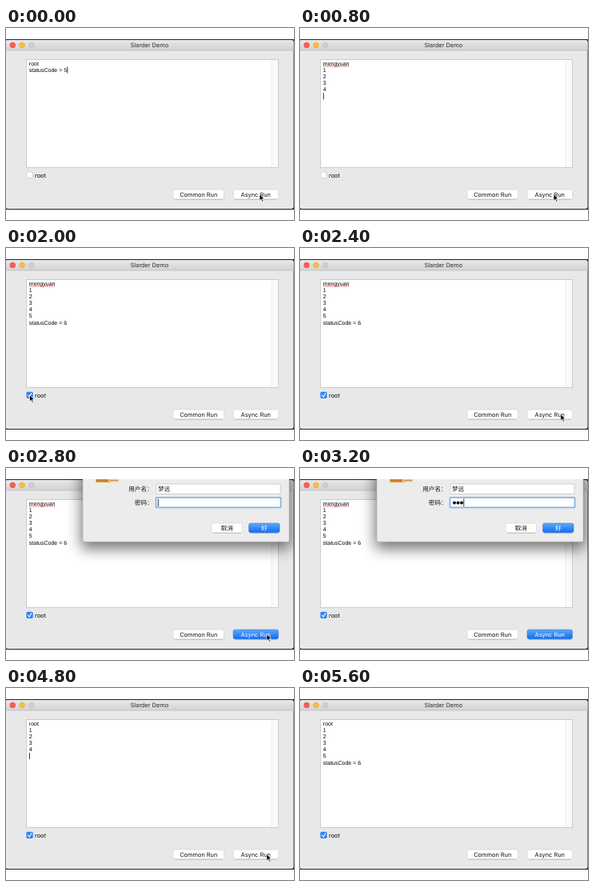
Recreate the animation shown at these times as an HTML page. Size 360 px wide and 240 px high, loop 6000 ms.

```html
<!DOCTYPE html>
<html lang="en">
<head>
<meta charset="utf-8">
<title>Demo</title>
<style>
  html, body { margin: 0; width: 100%; height: 100%; overflow: hidden; background: #fff; }
  svg { display: block; width: 360px; height: 240px; }
  text { white-space: pre; text-rendering: geometricPrecision; fill: #111; }
  .ui { font: 7.4px Inter, "Liberation Sans", sans-serif; }
  .mid { text-anchor: middle; }
  .out { font: 7px "Liberation Sans", Arial, sans-serif; fill: #000; }
  .cjk { font: 7.6px "Noto Sans CJK SC", "Noto Sans CJK", sans-serif; }
  .end { text-anchor: end; }
  .blue text { fill: #fff; }
</style>
</head>
<body>
<svg viewBox="0 0 360 240">
  <defs>
    <linearGradient id="bar" x2="0" y2="1">
      <stop stop-color="#e9e8e9"/><stop offset="1" stop-color="#d3d2d3"/>
    </linearGradient>
    <linearGradient id="accent" x2="0" y2="1">
      <stop stop-color="#5faaf9"/><stop offset="1" stop-color="#0f6bf3"/>
    </linearGradient>
    <clipPath id="screen"><rect y="14" width="360" height="213"/></clipPath>
    <filter id="blur" x="-30%" y="-50%" width="160%" height="200%"><feGaussianBlur stdDeviation="9"/></filter>
  </defs>
  <g clip-path="url(#screen)">
    <rect y="14" width="360" height="213" fill="#20242f"/>
    <rect x="-.5" y="15" width="360" height="211" rx="3" fill="#e8e8e8"/>
    <path d="M-.5 28V18a3 3 0 0 1 3-3H356.500a3 3 0 0 1 3 3V28Z" fill="url(#bar)"/>
    <path d="M0 28H359.500" stroke="#bcbbbc" stroke-width=".7"/>
    <g stroke-width=".5">
      <circle cx="8.300" cy="21.400" r="3.400" fill="#fc5b55" stroke="#dc4741"/>
      <circle cx="20" cy="21.400" r="3.400" fill="#fbbd3e" stroke="#d9a032"/>
      <circle cx="31.800" cy="21.400" r="3.400" fill="#d0cfd0" stroke="#bab9ba"/>
    </g>
    <text class="ui mid" x="179.300" y="24" fill-opacity=".85">Slarder Demo</text>

    <rect x="25.500" y="39.500" width="315" height="135" fill="#fff" stroke="#c3c3c3" stroke-width=".8"/>
    <rect x="332" y="40" width="8" height="134" fill="#fafafa"/>
    <path d="M332 40V174" stroke="#e6e6e6" stroke-width=".7"/>
    <g id="output"></g>
    <path id="squiggle" d="M29 48H61" stroke="#e8403a" stroke-width="1.100" stroke-dasharray="1.300 .9"/>
    <path id="caret" stroke="#000" stroke-width=".8"/>

    <g id="boxOff"><rect x="25.800" y="180" width="7.600" height="7.600" rx="1.500" fill="#fff" stroke="#bdbdbd" stroke-width=".6"/></g>
    <g id="boxOn">
      <rect x="25.500" y="179.700" width="8.200" height="8.200" rx="1.600" fill="#2f83f7"/>
      <path d="M27.500 184L29.200 186L31.900 181.600" fill="none" stroke="#fff" stroke-width="1.100" stroke-linecap="round"/>
    </g>
    <text class="ui" x="36" y="186.500">root</text>
    <g id="buttons"></g>

    <g id="dialog">
      <rect x="94" y="-20" width="262" height="121" rx="4" fill="#000" opacity=".55" filter="url(#blur)"/>
      <rect x="96" y="0" width="258" height="92.300" rx="2" fill="#ececec" stroke="#a5a5a5" stroke-width=".5"/>
      <path d="M112.500 13H131V18H112.500Z" fill="#d98f2b"/>
      <path d="M112.500 15.300H130" stroke="#b86e18" stroke-width=".8"/>
      <path d="M128 13H141V17.500H128Z" fill="#e9c795"/>
      <path d="M130 15.500H140" stroke="#b8873f" stroke-width=".8"/>
      <text class="cjk end" x="183.600" y="28.900">用户名：</text>
      <text class="cjk end" x="183.600" y="45.900">密码：</text>
      <rect x="188" y="20" width="155" height="12.500" fill="#fff" stroke="#bfbfbf" stroke-width=".7"/>
      <text class="cjk" x="190" y="28.900">梦远</text>
      <rect x="187.500" y="36.800" width="156" height="12.600" rx=".8" fill="#fff" stroke="#84b3ea" stroke-width="1.800"/>
      <g id="dots"><circle cx="193" cy="43.500" r="1.900"/><circle cx="197.500" cy="43.500" r="1.900"/><circle cx="202" cy="43.500" r="1.900"/></g>
      <path id="passCaret" stroke="#000" stroke-width=".8"/>
      <g id="choices"></g>
    </g>
    <path id="mouse" d="M0 0V8.200L1.900 6.500L3.300 9.700L4.700 9.100L3.300 6H5.800Z" stroke="#fff" stroke-width=".7" stroke-linejoin="round"/>
  </g>
</svg>
<script>
const $ = id => document.getElementById(id);
const STEP = 400, LOOP = 6000, LINE = 8.17;
const USER = "mengyuan";

const show = (id, on) => $(id).setAttribute("visibility", on ? "inherit" : "hidden");

function button(x, y, w, label, font, blue) {
  const paint = blue ? 'fill="url(#accent)" stroke="#2a6fd6"' : 'fill="#fff" stroke="#c6c6c6"';
  return `<g class="${blue ? "blue" : ""}">
    <path d="M${x + 2} ${y + 12.2}h${w - 4}" stroke="#aaa" stroke-width=".8"/>
    <rect x="${x}" y="${y}" width="${w}" height="11.8" rx="2.3" ${paint} stroke-width=".5"/>
    <text class="${font} mid" x="${x + w / 2}" y="${y + 8.6}">${label}</text></g>`;
}

// Output of a run: who, numbers printed so far, and the exit line.
function log(who, count, code) {
  const lines = [who];
  for (let i = 1; i <= count; i++) lines.push(String(i));
  lines.push(code ? "statusCode = " + code : "");
  return lines;
}

const ASYNC = [317, 207.5], ASYNC2 = [325.8, 207.5];
const done = log(USER, 5, 6);
const steps = [
  { out: log("root", 0, 5), mouse: ASYNC, caret: 1 },
  { out: log(USER, 2), mouse: ASYNC, caret: 1 },
  { out: log(USER, 4), mouse: ASYNC, caret: 1 },
  { out: log(USER, 5), mouse: ASYNC, caret: 1 },
  { out: done, mouse: [125.6, 208.5], caret: 1 },
  { out: done, mouse: [29.5, 183.5], root: 1 },
  { out: done, mouse: ASYNC2, root: 1 },
  { out: done, mouse: ASYNC2, root: 1, ask: 1 },
  { out: done, root: 1, ask: 1, typed: 1 },
  ...[1, 2, 3, 4, 5].map(n => ({ out: log("root", n), mouse: ASYNC2, root: 1, caret: 1 })),
  { out: log("root", 5, 6), root: 1 }
];

$("choices").innerHTML = button(257, 69, 38.5, "取消", "cjk") + button(303.5, 69, 38.5, "好", "cjk", true);

function draw(s) {
  $("output").innerHTML = s.out.map((t, i) =>
    `<text class="out" x="28.8" y="${46.6 + i * LINE}">${t}</text>`).join("");
  const last = s.out.length - 1;
  $("caret").setAttribute("d", `M${s.out[last] ? 76.8 : 29.4} ${40.2 + last * LINE}v8.2`);
  show("caret", s.caret);
  show("squiggle", s.out[0] === USER);
  show("boxOff", !s.root);
  show("boxOn", s.root);
  $("buttons").innerHTML = button(209, 202, 63.5, "Common Run", "ui") +
    button(284, 202, 56.5, "Async Run", "ui", s.ask);
  show("dialog", s.ask);
  show("dots", s.typed);
  $("passCaret").setAttribute("d", `M${s.typed ? 204.8 : 190.3} 38.6v9.4`);
  show("mouse", s.mouse);
  if (s.mouse) $("mouse").setAttribute("transform", `translate(${s.mouse})`);
}

let shown = -1;
function tick() {
  const i = Math.floor(performance.now() % LOOP / STEP);
  if (i !== shown) draw(steps[shown = i]);
  requestAnimationFrame(tick);
}
tick();
</script>
</body>
</html>
```
